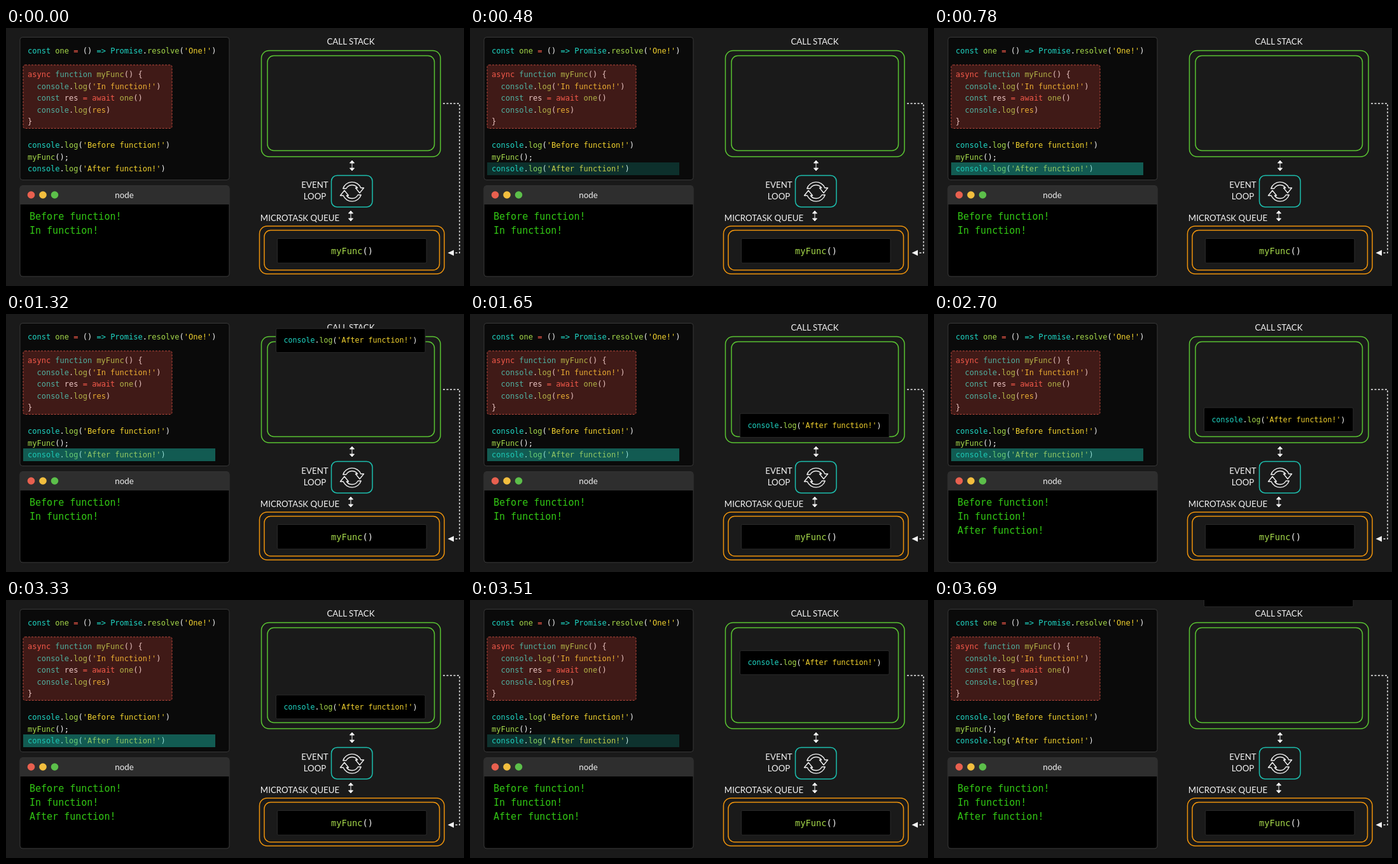
An HTML page for the animation above (6780 ms loop, 720 px wide and 405 px high).

```html
<!DOCTYPE html>
<html lang="en">
<head>
<meta charset="utf-8">
<title>Event loop</title>
<style>
  html, body { margin: 0; width: 100%; height: 100%; overflow: hidden; background: #1a1a1a; }
  svg { display: block; width: 100vw; height: 100vh; }
  text { white-space: pre; fill: #f2f2f2; }
  .label { font: 13.3px Lato, "Open Sans", sans-serif; text-anchor: middle; }
  .code { font: 12px "DejaVu Sans Mono", monospace; }
  .out { font: 15px "DejaVu Sans Mono", monospace; fill: #32c814; }
  .frame rect { fill: none; stroke-width: 1.5; }
  .card { fill: #000; stroke: #2a2a2a; }
  .line { fill: none; stroke: #f2f2f2; stroke-width: 1.4; }
</style>
</head>
<body>
<svg viewBox="0 0 720 405">
  <defs>
    <path id="updown" d="M0-5V5M-3.5-4L0-8L3.5-4ZM-3.5 4L0 8L3.5 4Z" fill="#f2f2f2" stroke="#f2f2f2"/>
    <path id="turn" class="line" stroke-linejoin="round"
      d="M-14.2-5A15 15 0 0 1 13.8-6H18.5L12 2L5.5-6H8.6A10.4 10.4 0 0 0 -9.2-5Z"/>
  </defs>
  <rect width="720" height="405" fill="#1a1a1a"/>

  <rect x="22" y="14.5" width="329" height="224" rx="4" fill="#0a0a0a" stroke="#383838"/>
  <g id="editor"></g>
  <rect x="27" y="58" width="234" height="99.5" rx="3" fill="#d2463c" fill-opacity=".27"
    stroke="#b8483c" stroke-dasharray="3 2"/>
  <rect id="mark" x="27" y="211" width="302" height="20" fill="#1bbca8" opacity="0"/>

  <rect x="22" y="247.5" width="329" height="142.5" rx="4" fill="#000" stroke="#3a3a3a"/>
  <path d="M22 277V251.500a4 4 0 0 1 4-4H347a4 4 0 0 1 4 4V277Z" fill="#2e2e2e"/>
  <circle cx="39.5" cy="262" r="5.8" fill="#e8604f"/>
  <circle cx="58" cy="262" r="5.8" fill="#f2be3e"/>
  <circle cx="76.500" cy="262" r="5.8" fill="#5cbf4a"/>
  <text class="label" x="186" y="266.5">node</text>
  <text class="out" x="37" y="300.5">Before function!</text>
  <text class="out" x="37" y="322.8">In function!</text>
  <text class="out" x="37" y="345" id="typed"></text>

  <text class="label" x="542" y="26">CALL STACK</text>
  <text class="label" x="485.5" y="251">EVENT</text>
  <text class="label" x="485.5" y="269">LOOP</text>
  <text class="label" x="462" y="302.5">MICROTASK QUEUE</text>
  <g class="frame" stroke="#5ac432">
    <rect x="401.5" y="35.5" width="281.5" height="166.500" rx="12"/>
    <rect x="411" y="43.5" width="262.500" height="149" rx="10"/>
  </g>
  <g class="frame" stroke="#ee930c">
    <rect x="398.5" y="311" width="290.500" height="75" rx="12"/>
    <rect x="406" y="317.5" width="275.500" height="62.500" rx="10"/>
  </g>
  <g class="frame" stroke="#1cbfae"><rect x="511.5" y="231.500" width="64.500" height="49.500" rx="9"/></g>
  <g transform="translate(544 257)">
    <use href="#turn"/><use href="#turn" transform="rotate(180)"/>
  </g>
  <use href="#updown" x="544" y="216"/>
  <use href="#updown" x="542" y="295"/>
  <path class="line" d="M687 118.500H713V353H703" stroke-dasharray="3 2.500"/>
  <path d="M694.500 353L704 348.500V357.500Z" fill="#f2f2f2"/>

  <rect class="card" x="426.500" y="330.500" width="234.500" height="38.500" rx="2"/>
  <g id="queued"></g>
  <g id="call"><rect class="card" x="424.500" width="234.500" height="37.500" rx="2"/></g>
</svg>
<script>
const $ = id => document.getElementById(id);
const LOOP = 6780, STEP = 30;
const REST = 147, HIDDEN = -40;
const OUTPUT = 'After function!';

const colors = [
  ['#f2d22e', /^('[^']*'|(?<=\()res)/],
  ['#ff5f4e', /^(async|await|=(?!>))/],
  ['#1fd6c4', /^(const|function|console|Promise|=>)/],
  ['#a5d84a', /^(log|resolve|one|myFunc)/],
  ['#f2f2f2', /^(\w+|\s+|.)/]
];

function addCode(parent, source, x, y, size = 12) {
  const make = (tag, parent) =>
    parent.appendChild(document.createElementNS('http://www.w3.org/2000/svg', tag));
  const text = make('text', parent);
  text.setAttribute('class', 'code');
  text.setAttribute('x', x);
  text.setAttribute('y', y);
  text.style.fontSize = size + 'px';
  let previous = '';
  while (source) {
    // Keep an opening bracket in view so that the argument rule can see it.
    const isArgument = previous === '(' && source.startsWith('res)');
    const [color, rule] = isArgument ? [colors[0][0], /^res/] : colors.find(c => c[1].test(source));
    previous = source.match(rule)[0];
    const span = make('tspan', text);
    span.textContent = previous;
    span.style.fill = color;
    source = source.slice(previous.length);
  }
}

`const one = () => Promise.resolve('One!')

async function myFunc() {
  console.log('In function!')
  const res = await one()
  console.log(res)
}

console.log('Before function!')
myFunc();
console.log('After function!')`.split('\n').forEach((line, i) =>
  addCode($('editor'), line, 34, 40 + 18.5 * i));
addCode($('queued'), 'myFunc()', 511, 354.5, 13.7);
addCode($('call'), "console.log('After function!')", 436.5, 22.5, 11.63);

const progress = (t, from, to) => Math.min(1, Math.max(0, (t - from) / (to - from)));
const bezier = (s, a, b) => 3 * (1 - s) ** 2 * s * a + 3 * (1 - s) * s * s * b + s ** 3;

// Ease with a slight overshoot before settling.
function overshoot(p) {
  let low = 0, high = 1;
  for (let i = 0; i < 20; i++) {
    const mid = (low + high) / 2;
    if (bezier(mid, .2, .5) < p) low = mid; else high = mid;
  }
  return bezier(high, .243, 1.38);
}

function draw(now) {
  const t = Math.floor(now % LOOP / STEP) * STEP;
  const shown = t < 3090
    ? overshoot(progress(t, 1200, 1860))
    : overshoot(1 - progress(t, 3090, 3720));
  const y = HIDDEN + (REST - HIDDEN) * shown;
  $('call').setAttribute('transform', `translate(0 ${y})`);
  $('mark').setAttribute('opacity', .45 * (progress(t, 210, 780) - progress(t, 3330, 3690)));
  $('typed').textContent = OUTPUT.slice(0, Math.max(0, Math.floor((t - 1850) / 53.5) + 1));
}

const start = performance.now();
function tick() {
  draw(performance.now() - start);
  requestAnimationFrame(tick);
}
tick();
</script>
</body>
</html>
```
